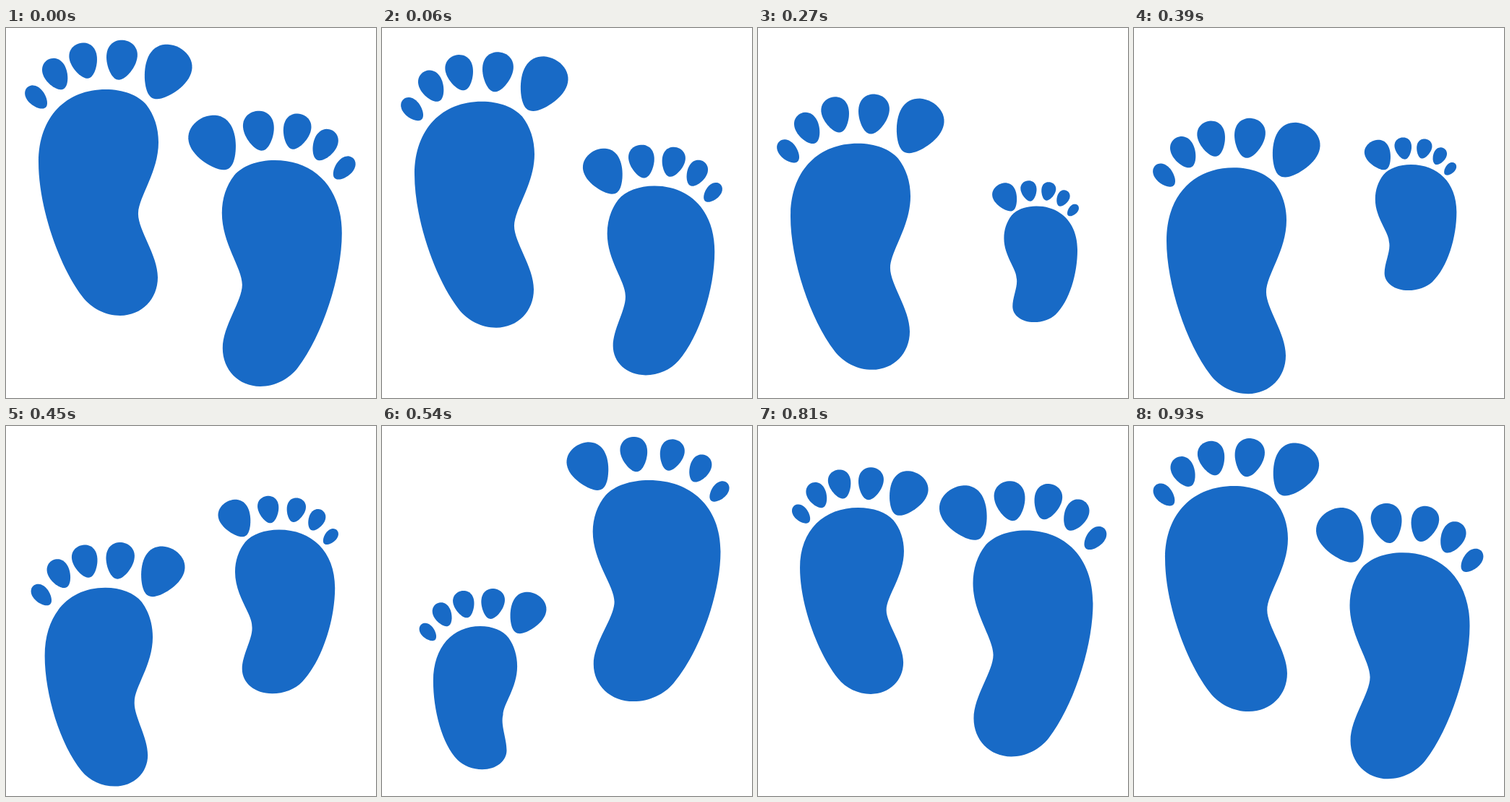
These frames come from a looping animation (512x512 px, 0.96 s). An HTML page:

```html
<!DOCTYPE html>
<html lang="en">
<head>
<meta charset="utf-8">
<title>Footsteps</title>
<style>
  html, body { margin: 0; width: 100%; height: 100%; overflow: hidden; background: #fff; }
  svg { display: block; width: 100vw; height: 100vh; fill: #186ac6; }
</style>
</head>
<body>
<svg viewBox="0 0 512 512">
  <g id="left"></g>
  <g id="right" transform="matrix(-1 0 0 1 509.8 0)"></g>
</svg>
<script>
const LOOP = 960, STEP = 30;
const SOLE_W = 166, SOLE_H = 313;
const TOE_MID = 132.25, SOLE_MID = 128, TOE_TOP = 44, TOE_RISE = 41;

// Outline of the planted sole, in percent of its box.
const SOLE = `M56 0C70.5 0 83 2.5 89.8 6.7C96.4 11.2 100 17 100 23.3
  C100 36.7 83.1 47.6 83.1 55C83.1 62.3 99.4 73.2 99.4 83.1
  C99.4 92.7 86.1 100 68.1 100C56 100 44 96.8 36.7 91.7
  C16.3 77.6 0 51.4 0 32.3C0 11.8 23.5 0 56 0Z`;

// Toes are tilted eggs: centre, half width and height, tilt, taper.
const TOES = [
  { x: 221, y: 62, a: 30.5, b: 39.5, tilt: 28, taper: .3 },
  { x: 159.4, y: 44.3, a: 20.7, b: 27.7, tilt: 10, taper: .25 },
  { x: 108, y: 45.3, a: 18.5, b: 25, tilt: -15, taper: .25 },
  { x: 69, y: 64, a: 16, b: 22.9, tilt: -27, taper: .2 },
  { x: 42.2, y: 96, a: 12, b: 18.8, tilt: -42, taper: .15 }
];

// Key poses: sole centre and top; a planted foot needs nothing more.
const LEFT = [
  { t: 0, x: 128, top: 85 },
  { t: 405, x: 128, top: 197.3 },
  { t: 540, x: 129, top: 277, w: .7, h: .633, lift: 1, toe: .76 },
  { t: 660, x: 130, top: 274, w: .53, h: .489, lift: .9, toe: .565 },
  { t: 810, x: 130, top: 113, w: .867, h: .824, toe: .815 },
  { t: 930, x: 128, top: 83, w: 1.024, h: .997, toe: .965, spread: 1 },
  { t: LOOP, x: 128, top: 85 }
];
const RIGHT = [
  { t: 0, x: 128, top: 183 },
  { t: 150, x: 117.6, top: 272, w: .738, h: .591, lift: 1, toe: .585 },
  { t: 320, x: 119, top: 236, w: .56, h: .48, lift: .9, toe: .49 },
  { t: 390, x: 119.7, top: 189, w: .678, h: .556, lift: .9, toe: .55 },
  { t: 540, x: 129.7, top: 75, w: 1.065, h: .978, toe: .88, spread: 1 },
  { t: 615, x: 131, top: 94.5 },
  { t: LOOP, x: 128, top: 183 }
];

const mix = (a, b, k) => a + (b - a) * k;
const clamp = v => Math.min(1, Math.max(0, v));
const fill = ({ toe = 1, ...key }) => ({ w: 1, h: 1, lift: 0, toe, spread: toe, ...key });

function poseAt(keys, t) {
  const i = keys.findIndex(key => key.t > t);
  const a = keys[i - 1], b = keys[i];
  const k = (t - a.t) / (b.t - a.t);
  const pose = {};
  for (const name in a) pose[name] = mix(a[name], b[name], k);
  return pose;
}

// A lifted foot has a lower arch and a heel drawn inward.
function solePath({ x, top, w, h, lift }) {
  return SOLE.replace(/([\d.]+) ([\d.]+)/g, (_, px, py) => {
    const heel = clamp((py - 58) / 15);
    const u = px - lift * heel * (5 + .07 * px);
    const v = +py + lift * 7 * Math.sin(Math.PI * py / 100);
    return `${x + (u / 100 - .5) * w * SOLE_W} ${top + v / 100 * h * SOLE_H}`;
  });
}

function eggPath({ a, b, taper }) {
  const points = Array.from({ length: 60 }, (_, i) => {
    const angle = i * Math.PI / 30, s = Math.sin(angle);
    return [a * Math.cos(angle) * (1 - taper * s), b * s];
  });
  return `M${points.join('L')}Z`;
}

function makeFoot(id, poses) {
  const keys = poses.map(fill);
  const group = document.getElementById(id);
  const addPath = d => {
    const path = document.createElementNS('http://www.w3.org/2000/svg', 'path');
    path.setAttribute('d', d);
    return group.appendChild(path);
  };
  const sole = addPath(SOLE);
  const toes = TOES.map(toe => addPath(eggPath(toe)));

  return t => {
    const pose = poseAt(keys, t);
    const { x, top, toe, spread } = pose;
    sole.setAttribute('d', solePath(pose));
    TOES.forEach((egg, i) => {
      const cx = x + (TOE_MID - SOLE_MID) * toe + (egg.x - TOE_MID) * spread;
      const cy = top - TOE_RISE * toe + (egg.y - TOE_TOP) * spread;
      toes[i].setAttribute('transform',
        `translate(${cx} ${cy}) scale(${toe}) rotate(${egg.tilt})`);
    });
  };
}

const feet = [makeFoot('left', LEFT), makeFoot('right', RIGHT)];
const start = performance.now();

function draw() {
  const t = Math.floor((performance.now() - start) % LOOP / STEP) * STEP;
  feet.forEach(foot => foot(t));
  requestAnimationFrame(draw);
}
draw();
</script>
</body>
</html>
```
